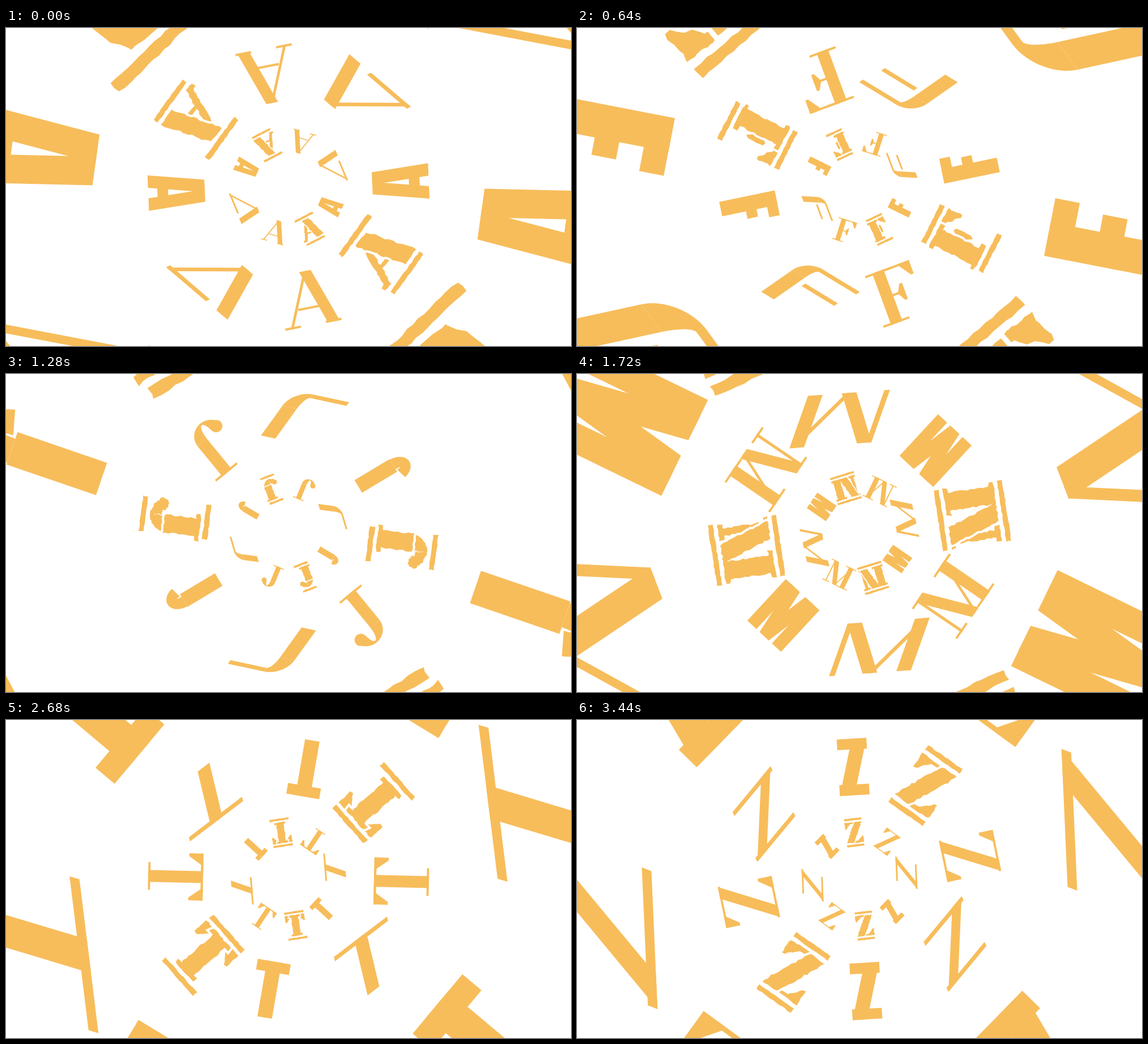
Recreate the animation shown at these times as an HTML page with a canvas. Size 998 by 561 pixels, loop 3480 ms.

```html
<!DOCTYPE html>
<html lang="en">
<head>
<meta charset="utf-8">
<title>Alphabet rings</title>
<style>
html, body { margin: 0; height: 100%; overflow: hidden; background: #fff; }
canvas { display: block; }
</style>
</head>
<body>
<canvas id="stage" width="998" height="561"></canvas>
<script>
const ctx = document.getElementById('stage').getContext('2d');
const INK = '#f7bd5b';
const FRAME = 40, FRAMES = 87;

// Letter recipes: width, then parts.
// K/k thick/thin stroke, b bar, D bowl, c arc band, f foot serif, v wedge serif, o ball
const LETTERS = {
  A: [88, 'k50,0,0,100 K50,0,100,100 b22,76,68 f5,100 f88,100'],
  B: [78, 'K10,0,10,100 D14,0,92,52 D14,48,100,100'],
  C: [78, 'c0,0,100,100,45,315'],
  D: [82, 'K10,0,10,100 D12,0,100,100'],
  E: [76, 'K10,0,10,100 b10,96,0 b10,66,50 b10,100,100 v96,0,1 v66,50,.6 v66,50,-.6 v100,100,-1'],
  F: [74, 'K10,0,10,100 b10,100,0 b10,66,50 v100,0,1 v66,50,.6 v66,50,-.6'],
  G: [82, 'c0,0,100,100,30,315 K100,55,100,100'],
  H: [90, 'K8,0,8,100 K92,0,92,100 b10,90,50'],
  I: [40, 'K50,0,50,100'],
  J: [62, 'K90,0,90,72 c0,44,93,100,0,165 o16,78'],
  K: [88, 'K8,0,8,100 k95,0,15,58 K38,38,100,100 f90,0 f88,100'],
  L: [72, 'K10,0,10,100 b10,100,100 v100,100,-1'],
  M: [108, 'k10,0,10,100 K10,0,50,100 k90,0,50,100 K90,0,90,100'],
  N: [92, 'k10,0,10,100 K8,0,92,100 k92,0,92,100'],
  O: [82, 'c0,0,100,100,0,360'],
  P: [76, 'K12,0,12,100 D14,0,100,56'],
  Q: [82, 'c0,0,100,100,0,360 K50,70,100,108'],
  R: [82, 'K10,0,10,100 D14,0,92,52 K45,48,100,100'],
  S: [62, 'c0,0,100,54,90,335 c0,46,100,100,-90,155'],
  T: [83, 'K50,0,50,100 b0,100,0 v0,0,1 v100,0,1'],
  U: [86, 'K0,0,0,65 K100,0,100,65 c0,30,100,100,0,180'],
  V: [88, 'K0,0,50,100 k100,0,50,100 f12,0 f95,0'],
  W: [114, 'K0,0,27,100 k52,0,27,100 K47,0,74,100 k100,0,74,100 f8,0 f96,0'],
  X: [88, 'K0,0,100,100 k100,0,0,100 f12,0 f94,0 f6,100 f88,100'],
  Y: [86, 'K0,0,50,56 k100,0,50,56 K50,55,50,100 f12,0 f95,0'],
  Z: [74, 'K100,0,0,100 b0,100,0 b0,100,100 v0,0,1 v100,100,-1']
};

const STYLES = [
  { name: 'block', angle: 0, wide: .71, top: 148, base: 248, thick: 26, thin: 22, bar: 19, curve: 21,
    alt: {
      A: 'k29,0,0,100 k71,0,100,100 b20,80,80',
      F: 'K6,0,6,100 b4,88,0 b4,78,47',
      M: 'k-4,0,-4,100 k18,0,50,100 k82,0,50,100 k104,0,104,100',
      P: 'K4,0,4,100 D4,0,110,61',
      W: 'k0,0,22,100 k50,0,22,100 k50,0,78,100 k100,0,78,100'
    } },
  { name: 'stencil', angle: 38.5, wide: 1, top: 157, base: 246, thick: 32, thin: 13, bar: 8,
    foot: 8, footHeight: 9, wedge: [24, 32], rough: 1.6 },
  { name: 'didone', angle: 81.5, wide: 1, top: 151, base: 248, thick: 21, thin: 5, bar: 4,
    foot: 14, footHeight: 4, wedge: [20, 26] },
  { name: 'slanted', angle: 133, wide: 1.42, top: 158, base: 248, thick: 26, thin: 10, bar: 8, slant: .44,
    alt: {
      A: 'k50,0,-8,100 K50,0,108,100 b-8,66,100',
      F: 'K0,32,0,100 c0,0,62,64,180,270 b30,104,0 b34,98,45',
      J: 'K100,0,100,66 c20,32,100,100,0,90 b-14,60,100',
      M: 'k3,0,3,100 K3,0,50,100 k97,0,50,100 K97,0,97,100',
      P: 'K-4,0,-4,100 D-3,0,112,63'
    } }
];

let seed = 7;
const random = () => (seed = seed * 16807 % 2147483647) / 2147483647;

function roughen(points, amount) {
  const out = [];
  points.forEach(([x, y], i) => {
    const [nx, ny] = points[(i + 1) % points.length];
    const steps = Math.max(1, Math.round(Math.hypot(nx - x, ny - y) / 6));
    for (let s = 0; s < steps; s++) {
      out.push([x + (nx - x) * s / steps + (random() - .5) * 2 * amount,
                y + (ny - y) * s / steps + (random() - .5) * 2 * amount]);
    }
  });
  return out;
}

function toPath(points, rough) {
  const path = new Path2D();
  (rough ? roughen(points, rough) : points).forEach(p => path.lineTo(...p));
  path.closePath();
  return path;
}

const box = (x, y, w, h) => [[x, y], [x + w, y], [x + w, y + h], [x, y + h]];

function arc(cx, cy, rx, ry, from, to) {
  const n = Math.ceil(Math.abs(to - from) / 6);
  return Array.from({ length: n + 1 }, (_, i) => {
    const a = (from + (to - from) * i / n) * Math.PI / 180;
    return [cx + Math.max(rx, 1) * Math.cos(a), cy + Math.max(ry, 1) * Math.sin(a)];
  });
}

function buildGlyph(letter, style) {
  const w = LETTERS[letter][0] * style.wide;
  const recipe = style.alt?.[letter] || LETTERS[letter][1];
  const { top, base, thick, bar, curve = thick, slant = 0, foot, footHeight, wedge, rough } = style;
  const glyph = { light: [], heavy: [] };
  const place = ([x, y]) => {
    const py = top + y * (base - top) / 100;
    return [x - w / 2 + slant * (base - py), py];
  };
  const add = (layer, points) => glyph[layer].push(toPath(points.map(place), rough));
  const addFoot = (layer, x, width, y) =>
    add(layer, box(x - foot, y ? 100 - footHeight : 0, width + 2 * foot, footHeight));

  const parts = {
    stroke(layer, weight, x0, y0, x1, y1) {
      const a = x0 * (w - weight) / 100, b = x1 * (w - weight) / 100;
      add(layer, [[a, y0], [a + weight, y0], [b + weight, y1], [b, y1]]);
      if (foot && x0 === x1) {
        if (y0 === 0) addFoot(layer, a, weight, 0);
        if (y1 === 100) addFoot(layer, a, weight, 100);
      }
    },
    K: (...p) => parts.stroke('heavy', thick, ...p),
    k: (...p) => parts.stroke('light', style.thin, ...p),
    b: (x0, x1, y) => add('light', box(x0 * w / 100, y * (100 - bar) / 100, (x1 - x0) * w / 100, bar)),
    D(x0, y0, x1, y1) {
      const left = x0 * w / 100, right = x1 * w / 100;
      const ry = (y1 - y0) / 2, rx = Math.min((right - left) * .75, ry * 1.1);
      const cx = right - rx, cy = y0 + ry;
      add('light', [[left, y0], ...arc(cx, cy, rx, ry, -90, 90), [left, y1], [left, y1 - bar],
        ...arc(cx, cy, rx - curve, ry - bar, 90, -90), [left, y0 + bar]]);
    },
    c(x0, y0, x1, y1, from, to) {
      const rx = (x1 - x0) * w / 200, ry = (y1 - y0) / 2, cx = x0 * w / 100 + rx, cy = y0 + ry;
      add('light', [...arc(cx, cy, rx, ry, from, to), ...arc(cx, cy, rx - curve, ry - bar, to, from)]);
    },
    f: (x, y) => foot && addFoot('light', x * w / 100, 0, y),
    v(x, y, dir) {
      if (!wedge) return;
      const px = x * w / 100, inward = x < 50 ? 1 : -1;
      const reach = inward * wedge[0] * Math.abs(dir);
      add('light', [[px, y], [px, y + dir * wedge[1]], [px + inward * 5, y + dir * wedge[1]],
        [px + reach, y + dir * bar], [px + reach, y]]);
    },
    o: (x, y) => foot && add('light', arc(x * w / 100, y, 11, 11, 0, 354))
  };
  for (const part of recipe.split(' ')) parts[part[0]](...part.slice(1).split(',').map(Number));

  if (rough) {
    for (const y of [141, 254]) glyph.heavy.push(toPath(box(-w / 2, y, w, 9), .8));
  }
  return glyph;
}

const glyphs = Object.keys(LETTERS).map(letter => STYLES.map(style => buildGlyph(letter, style)));

function drawGlyph(glyph, rough) {
  glyph.light.forEach(p => ctx.fill(p));
  if (rough) glyph.heavy.forEach(p => ctx.stroke(p));
  glyph.heavy.forEach(p => ctx.fill(p));
}

// Opposite halves of each ring repeat the same four styles.
function drawRing(scale, degrees, set) {
  STYLES.forEach((style, i) => {
    for (const half of [0, 180]) {
      ctx.save();
      ctx.translate(499, 280.5);
      ctx.rotate((degrees + style.angle + half) * Math.PI / 180);
      ctx.scale(scale, scale);
      drawGlyph(set[i], style.rough);
      ctx.restore();
    }
  });
}

function draw(now) {
  const frame = Math.floor(now / FRAME) % FRAMES;
  const t = frame / FRAMES;
  const ease = (1 - Math.cos(Math.PI * t)) / 2;
  const set = glyphs[Math.min(25, Math.floor((frame + 1.15) / 3.42))];

  ctx.fillStyle = '#fff';
  ctx.fillRect(0, 0, 998, 561);
  ctx.fillStyle = INK;
  ctx.strokeStyle = '#fff';
  ctx.lineWidth = 8;
  drawRing(.41, 114.5 + 20.5 * ease, set);
  drawRing(1, 87.5 - 91 * (.8 * ease + .2 * t), set);
  drawRing(2.32, 98 + 36.5 * ease, set);
}

const start = performance.now();
function loop() {
  draw(performance.now() - start);
  requestAnimationFrame(loop);
}
loop();
</script>
</body>
</html>
```
